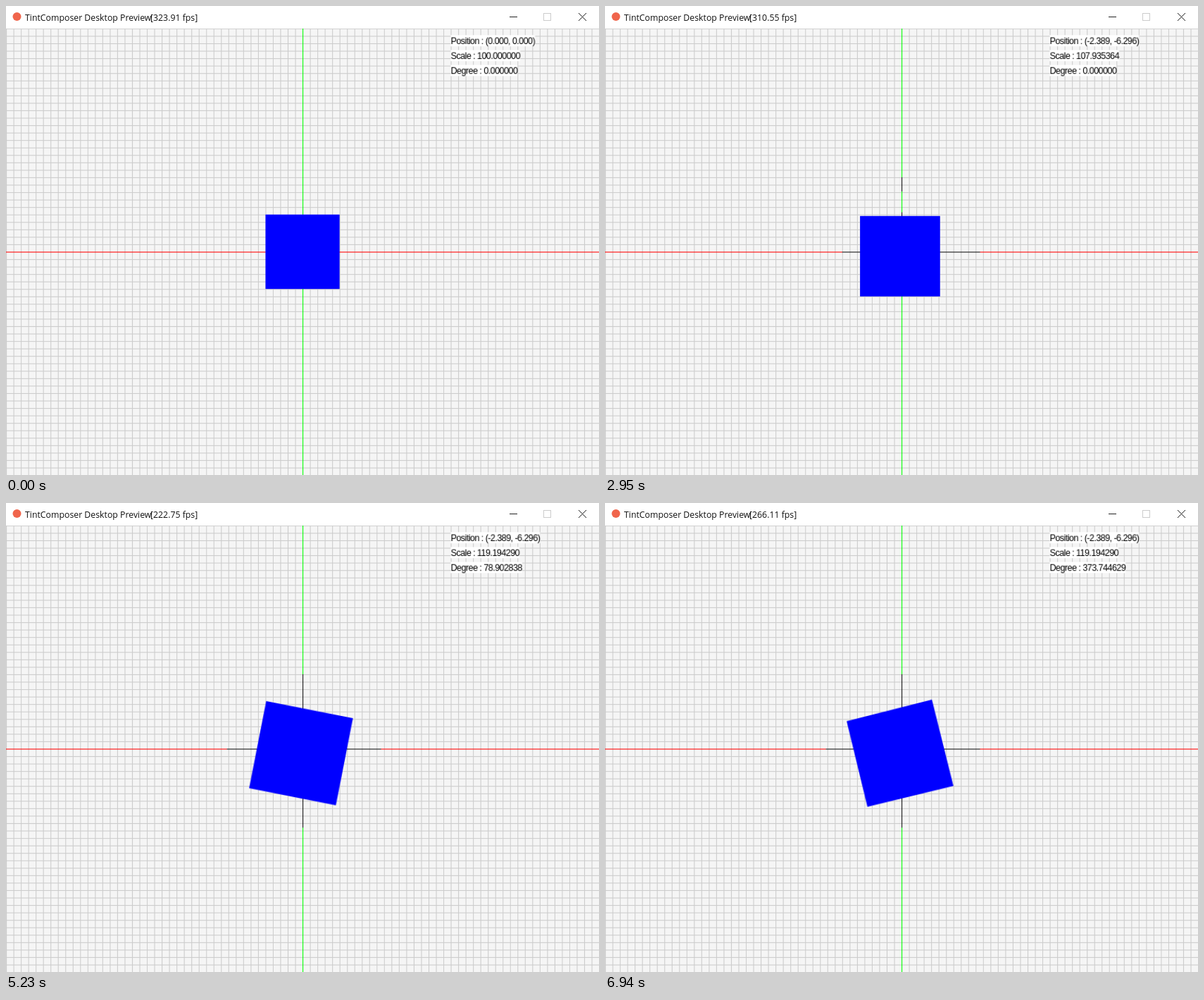
Recreate the animation shown at these times as an HTML page with a canvas. Size 842 by 665 pixels, loop 7.07 s.

```html
<!DOCTYPE html>
<html lang="en">
<head>
<meta charset="utf-8">
<style>
html, body { margin: 0; width: 100%; height: 100%; overflow: hidden; background: #fff; }
canvas { display: block; }
</style>
</head>
<body>
<canvas id="stage" width="842" height="665"></canvas>
<script>
const stage = document.getElementById('stage').getContext('2d');
const plane = new OffscreenCanvas(800, 600).getContext('2d');
const LOOP = 7070, FIRST = 330, STEP = 68.85, LAST = 96;
const CX = 400, CY = 300;

// Key points: [tick, value, ...]
const posKeys = [
  [3, 0, 0], [9, -30.125, 30.912], [13, -17.5, 49.8], [19.3, 26.6, 49.8],
  [25, 56.353, 20.089], [26.5, 56.353, 10], [30, 40, -6.296], [36, -2.389, -6.296]
];
const scaleKeys = [[36.85, 100], [38, 107.935364], [51.3, 200], [53, 200], [62, 137.787018], [64.7, 119.19429]];
const degreeKeys = [[64.3, 0], [80, 184.891724], [96, 373.744629]];
const fpsKeys = [[-1, 323.91], [9, 317.36], [25, 325.69], [38, 310.55], [62, 224.6], [80, 211.21], [96, 266.11]];

// Linear between key points; jitter fades out at each of them
function track(keys, tick, jitter = 0) {
  const next = keys.findIndex(k => k[0] > tick);
  if (next === 0) return keys[0].slice(1);
  if (next < 0) return keys[keys.length - 1].slice(1);
  const a = keys[next - 1], b = keys[next];
  const u = (tick - a[0]) / (b[0] - a[0]);
  const noise = jitter * u * (1 - u) * Math.sin(tick * tick * 2.7);
  return a.slice(1).map((v, i) => v + (b[i + 1] - v) * u + noise);
}

function poseAt(tick) {
  const [x, y] = track(posKeys, tick);
  const [scale] = track(scaleKeys, tick);
  const [degree] = track(degreeKeys, tick);
  return { x, y, scale, degree };
}

function rect(ctx, color, x, y, w, h) {
  ctx.fillStyle = color;
  ctx.fillRect(x, y, w, h);
}

function drawGrid() {
  rect(plane, '#f5f5f5', 0, 0, 800, 600);
  for (let x = 0; x < 800; x += 10) rect(plane, '#cccccc', x, 0, 1, 600);
  for (let y = 0; y < 600; y += 10) rect(plane, '#cccccc', 0, y, 800, 1);
}

// Stretch of an axis under the square, or null when it is clear of the axis
function span(center, offset, scale) {
  const half = scale / 2;
  return Math.abs(offset) < half
    ? [Math.round(center - half), Math.round(center + half)]
    : null;
}

// Sliding along an axis leaves it dark; stepping off it sideways restores it
function drawAxis(tick, color, spanOf, paint) {
  paint(color, 0, 800);
  let before = spanOf(poseAt(-1));
  for (let t = 0; t <= tick; t++) {
    const now = spanOf(poseAt(t));
    if (before && now) {
      if (now[0] > before[0]) paint('#111', before[0], now[0]);
      if (now[1] < before[1]) paint('#111', now[1], before[1]);
    } else if (before) {
      paint(color, ...before);
    }
    before = now;
  }
}

function drawSquare({ x, y, scale, degree }) {
  plane.fillStyle = '#0000ff';
  plane.beginPath();
  for (let corner = 45; corner < 360; corner += 90) {
    const angle = (degree + corner) * Math.PI / 180, r = scale * Math.SQRT1_2;
    plane.lineTo(Math.round(CX + x + r * Math.cos(angle)), Math.round(CY - y - r * Math.sin(angle)));
  }
  plane.fill();
}

function drawReadout({ x, y, scale, degree }) {
  plane.font = '12px "Liberation Sans", Arial, sans-serif';
  plane.letterSpacing = '-0.55px';
  [
    `Position : (${x.toFixed(3)}, ${y.toFixed(3)})`,
    `Scale : ${scale.toFixed(6)}`,
    `Degree : ${degree.toFixed(6)}`
  ].forEach((str, i) => {
    const base = 21 + 20 * i;
    rect(plane, '#fff', 600, base - 12, plane.measureText(str).width, 15);
    plane.fillStyle = '#000';
    plane.fillText(str, 600, base);
  });
}

function drawWindowBar(tick) {
  rect(stage, '#fff', 0, 0, 842, 32);
  stage.fillStyle = '#f0654c';
  stage.beginPath();
  stage.arc(15.5, 15, 6, 0, 7);
  stage.fill();
  stage.font = '12.3px "Open Sans", "Noto Sans", sans-serif';
  stage.fillStyle = '#111';
  stage.fillText('TintComposer Desktop Preview', 27, 21);
  stage.fillText(`[${track(fpsKeys, tick, 20)[0].toFixed(2)} fps]`, 205, 21);
  rect(stage, '#222', 715, 15, 11, 1);
  stage.strokeStyle = '#ccc';
  stage.strokeRect(763.5, 10.5, 10, 10);
  stage.strokeStyle = '#222';
  stage.stroke(new Path2D('M813 10l11 11m0-11l-11 11'));
}

function draw(ms) {
  const tick = Math.min(LAST, Math.max(-1, Math.floor((ms - FIRST + 10) / STEP)));
  const pose = poseAt(tick);
  drawGrid();
  drawAxis(tick, '#ff0000', p => span(CX + p.x, p.y, p.scale),
    (color, from, to) => rect(plane, color, from, CY, to - from, 1));
  drawAxis(tick, '#00ff00', p => span(CY - p.y, p.x, p.scale),
    (color, from, to) => rect(plane, color, CX, from, 1, to - from));
  drawSquare(pose);
  drawReadout(pose);
  stage.drawImage(plane.canvas, 0, 31.8, 842, 633.2);
  drawWindowBar(tick);
}

const start = performance.now();
function loop() {
  draw((performance.now() - start) % LOOP);
  requestAnimationFrame(loop);
}
loop();
</script>
</body>
</html>
```
